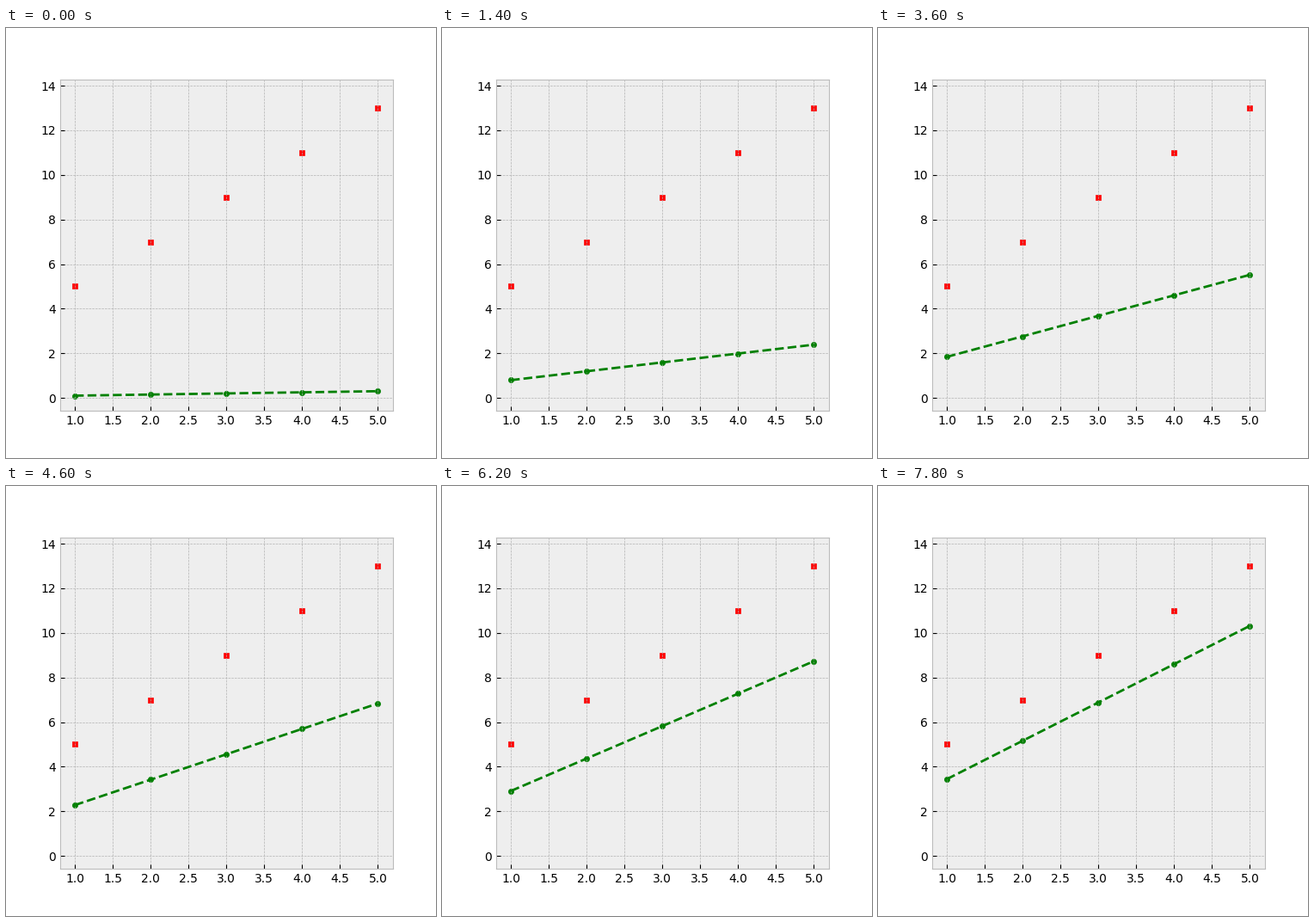
Recreate the animation shown at these times as a matplotlib script. Size 500 px wide and 500 px high, loop 8000 ms.

```python
import matplotlib.pyplot as plt
import numpy as np
from matplotlib.animation import FuncAnimation

FRAMES = 40
STEP_MS = 200
RATE, BETA1, BETA2 = 0.05, 0.9, 0.999

x = np.arange(1.0, 6.0)
y = 2 * x + 3


def fit_path(steps):
    """Slope and intercept after each Adam step of a least-squares fit."""
    p, m, v = np.zeros(2), np.zeros(2), np.zeros(2)
    path = []
    for t in range(1, steps + 1):
        err = p[0] * x + p[1] - y
        grad = 2 * np.array([np.mean(err * x), np.mean(err)])
        m = BETA1 * m + (1 - BETA1) * grad
        v = BETA2 * v + (1 - BETA2) * grad**2
        m_hat = m / (1 - BETA1**t)
        v_hat = v / (1 - BETA2**t)
        p = p - RATE * m_hat / (np.sqrt(v_hat) + 1e-8)
        path.append(p)
    return path


path = fit_path(FRAMES)

plt.style.use("bmh")
plt.rcParams["axes.axisbelow"] = "line"
fig, ax = plt.subplots(figsize=(5, 5), dpi=100)
ax.scatter(x, y, s=20, c="red", marker="s")
dots = ax.scatter(x, y, s=20, c="green", marker="o")
line, = ax.plot(x, y, "--", color="green", lw=2)
ax.set_xlim(0.8, 5.2)
ax.set_ylim(-0.575, 14.275)


def draw(i):
    slope, intercept = path[i]
    fit = slope * x + intercept
    line.set_data(x, fit)
    dots.set_offsets(np.column_stack([x, fit]))
    return line, dots


anim = FuncAnimation(fig, draw, frames=FRAMES, init_func=lambda: draw(0),
                     interval=STEP_MS, repeat=True, repeat_delay=0)
plt.show()
```
